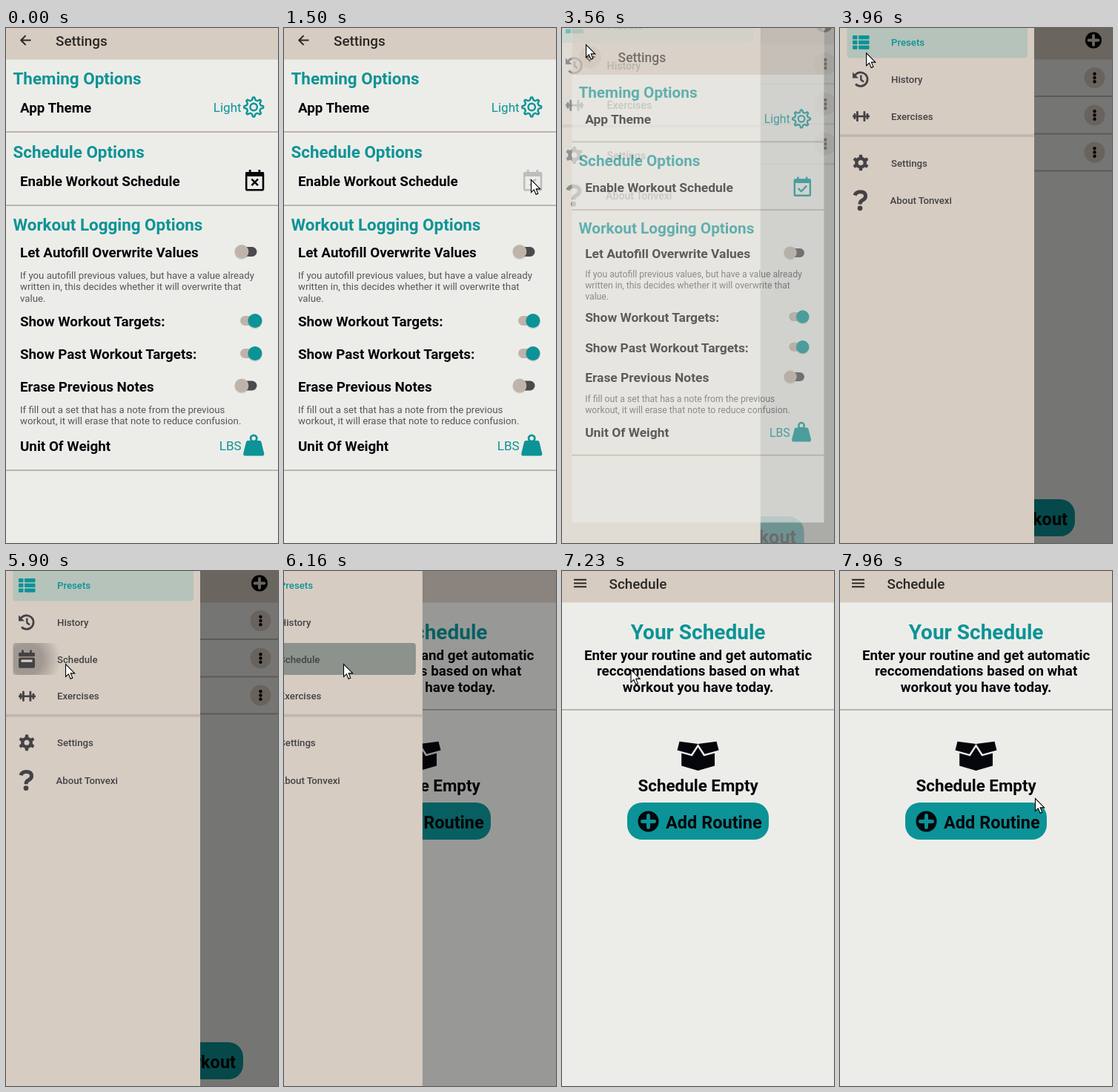
Recreate the animation shown at these times as an HTML page. Size 367 by 694 pixels, loop 8 s.

```html
<!DOCTYPE html>
<html lang="en">
<head>
<meta charset="utf-8">
<style>
html, body { margin: 0; height: 100%; overflow: hidden; background: #ecede8; }
svg { display: block; width: 100vw; height: 100vh; font-family: Roboto, sans-serif; }
</style>
</head>
<body>
<svg id="stage" viewBox="0 0 367 694"></svg>
<script>
const TEAL = '#0c9397', INK = '#05060c', TAN = '#d7ccc2', PAGE = '#ecede8', RULE = '#bfb3ab', DARK = '#434246';

const text = (x, mid, size, weight, fill, str, anchor = 'start') =>
  `<text x="${x}" y="${mid + size * .356}" font-size="${size}" font-weight="${weight}" fill="${fill}" text-anchor="${anchor}">${str}</text>`;
const rect = (x, y, w, h, fill, r = 0) =>
  `<rect x="${x}" y="${y}" width="${w}" height="${h}" rx="${r}" fill="${fill}"/>`;
const disc = (x, y, r, fill) => `<circle cx="${x}" cy="${y}" r="${r}" fill="${fill}"/>`;
const ring = (x, y, r, color, w) => `<circle cx="${x}" cy="${y}" r="${r}" fill="none" stroke="${color}" stroke-width="${w}"/>`;
const line = (d, color, w, cap = 'butt') =>
  `<path d="${d}" fill="none" stroke="${color}" stroke-width="${w}" stroke-linecap="${cap}" stroke-linejoin="round"/>`;
const shape = (d, fill) => `<path d="${d}" fill="${fill}" fill-rule="evenodd"/>`;
const group = (id, body) => `<g id="${id}">${body}</g>`;
const rule = y => rect(0, y - 1, 367, 2, RULE);
const page = rect(0, -52, 367, 746, PAGE) + rect(0, -52, 367, 94.5, TAN);

function gear(cx, cy, teeth, outer, inner, tip, root) {
  const pts = [];
  for (let i = 0; i < teeth; i++)
    for (const [off, r] of [[-root, inner], [-tip, outer], [tip, outer], [root, inner]]) {
      const a = (i + off) / teeth * 2 * Math.PI - Math.PI / 2;
      pts.push((cx + r * Math.cos(a)).toFixed(2) + ' ' + (cy + r * Math.sin(a)).toFixed(2));
    }
  return 'M' + pts.join('L') + 'Z';
}

const plus = (x, y, r, fill, cross) => disc(x, y, r, fill) +
  line(`M${x - r * .58} ${y}h${r * 1.16}M${x} ${y - r * .58}v${r * 1.16}`, cross, r * .35, 'round');

// Settings page
const label = (y, str) => text(19, y, 18.8, 700, INK, str);
const heading = (y, str) => text(9.5, y, 22.4, 700, TEAL, str);
const note = (y, lines) => lines.map((s, i) => text(19, y + i * 15.8, 13.2, 400, '#55565a', s)).join('');
const toggle = (y, on) => on
  ? rect(316, y - 6.5, 26, 13, RULE, 6.5) + disc(336, y + 1, 10, '#0002') + disc(336, y, 9.4, TEAL)
  : rect(312, y - 6.5, 26.5, 13, '#4b4a4c', 6.5) + disc(318, y + 1, 10, '#0001') + disc(318, y, 9.4, '#bfb4aa');
const calendar = (color, mark) =>
  `<rect x="324.2" y="195.2" width="22.8" height="23" rx="1.5" fill="none" stroke="${color}" stroke-width="2.6"/>` +
  rect(323.5, 194, 24.2, 6, color) + rect(327.8, 191, 2.8, 5, color) + rect(340.5, 191, 2.8, 5, color) +
  line(mark, color, 2.5);

const settings = page +
  group('press', disc(26.5, 17, 16, '#9a785024')) +
  line('M33.5 16.5H20.5M26.6 10.1L20.2 16.5L26.6 22.9', '#2a2825', 2) +
  text(67, 17.5, 18.85, 500, '#2a2825', 'Settings') +
  heading(68, 'Theming Options') + label(107, 'App Theme') +
  text(317.6, 107, 17, 400, TEAL, 'Light', 'end') +
  line(gear(334.2, 106.5, 8, 13, 9.6, .1, .32), TEAL, 2.4) + ring(334.2, 106.5, 4.7, TEAL, 2.4) +
  rule(140) + heading(167, 'Schedule Options') + label(206, 'Enable Workout Schedule') +
  group('calOff', calendar(INK, 'M331.4 203.6l8.6 8.6M340 203.6l-8.6 8.6')) +
  group('calOn', calendar(TEAL, 'M329.6 207.8l4.4 4.4l7.8-8.2')) +
  rule(239) + heading(265.5, 'Workout Logging Options') +
  label(302.5, 'Let Autofill Overwrite Values') + toggle(301.5) +
  note(333, ['If you autofill previous values, but have a value already',
    'written in, this decides whether it will overwrite that', 'value.']) +
  label(395.5, 'Show Workout Targets:') + toggle(394.5, true) +
  label(439.5, 'Show Past Workout Targets:') + toggle(438.5, true) +
  label(483, 'Erase Previous Notes') + toggle(482) +
  note(514, ['If fill out a set that has a note from the previous',
    'workout, it will erase that note to reduce confusion.']) +
  label(563, 'Unit Of Weight') + text(317.6, 563, 17, 400, TEAL, 'LBS', 'end') +
  ring(334.2, 553, 4.1, TEAL, 2.8) +
  shape('M326.5 556H342q2 0 2.5 2L348.2 573q.6 3.5-2.5 3.5H322.8q-3.1 0-2.5-3.5L324 558q.5-2 2.5-2Z', TEAL) +
  rule(596);

// Home page
const home = page + plus(342, 16.5, 11, '#000', TAN) +
  [67, 117.5, 167.5].map(y => rule(y + 25) + disc(343.5, y, 14, '#d3c7bc') +
    [-5.2, 0, 5.2].map(d => disc(343.5, y + d, 2.2, '#000')).join('')).join('') +
  `<rect id="start" y="635" height="50" rx="20" fill="${TEAL}"/>` +
  group('startText', text(307, 661.5, 23.5, 700, '#000', 'Start Workout', 'end'));

// Schedule page
const center = (y, size, fill, str) => text(183.6, y, size, 700, fill, str, 'middle');
const schedule = page +
  line('M16 11.8h17M16 16.5h17M16 21.2h17', '#2a2825', 2) +
  text(63.5, 17.5, 18.85, 500, '#2a2825', 'Schedule') +
  center(82, 28, TEAL, 'Your Schedule') +
  ['Enter your routine and get automatic', 'reccomendations based on what', 'workout you have today.']
    .map((s, i) => center(113 + i * 21.7, 18.75, INK, s)).join('') +
  rule(187) +
  shape('M158.5 229.7L183.5 233L174.5 246.7L155.5 241.5ZM208.5 229.7L183.5 233L192.5 246.7L211.5 241.5Z' +
    'M161.2 245.5L175.7 249.5L183.5 237.5L191.3 249.5L206 245.5V262.5L183.5 269L161.2 262.5Z', INK) +
  center(289.5, 22.4, INK, 'Schedule Empty') +
  rect(88, 312, 191, 50, TEAL, 20) + plus(116.5, 337.5, 14, INK, TEAL) +
  text(140, 339, 23.5, 700, INK, 'Add Routine');

// Drawer
const item = (x, y, str, fill = DARK) => text(x, y, 13.2, 500, fill, str);
const grid = [10, 16.7, 23.4].map(y => rect(17, y, 6.5, 5.3, TEAL, 1) + rect(25, y, 14.5, 5.3, TEAL, 1)).join('');
const clock = line('M20.3 63.5A9.3 9.3 0 1 1 21 75.5', DARK, 2.7) +
  shape('M17 59.5V67.5H25Z', DARK) + line('M28.3 63.5V69.7L32 72.5', DARK, 2.4);
const dumbbell = rect(17, 117.7, 23, 2.6, DARK) +
  [[18.5, 8], [22, 14], [31.5, 14], [35.5, 8]].map(([x, h]) => rect(x, 119 - h / 2, 2.8, h, DARK, 1)).join('');
const dayIcon = rect(17, 110, 22, 5.2, DARK, 1.5) + rect(21, 106.5, 3, 5, DARK, 1) + rect(32, 106.5, 3, 5, DARK, 1) +
  rect(17, 116.8, 22, 14, DARK, 2) + rect(20.5, 119.5, 15, 3.2, TAN, .5);
const cog = shape(gear(28, 181.5, 6, 11, 8, .17, .29) + 'M24.5 181.5a3.5 3.5 0 1 0 7 0a3.5 3.5 0 1 0-7 0Z', DARK);
const query = line('M20 225.5Q21.5 220.7 27.3 220.7Q34.5 220.7 34.5 226.5Q34.5 230 30.5 232Q27 233.7 27 237.5', DARK, 5) +
  disc(27, 242.8, 3.4, DARK);

const drawer = rect(0, -52, 262, 746, TAN) +
  `<rect id="active" x="9.5" width="243.5" height="43" rx="4" fill="${TEAL}" fill-opacity=".17"/>` +
  grid + item(69, 19.5, 'Presets', TEAL) + clock + item(69, 69.5, 'History') +
  group('dayItem', '<g clip-path="url(#itemClip)"><circle id="ripple" cx="28" cy="119" fill="url(#soft)"/></g>' +
    dayIcon + item(69, 119, 'Schedule')) +
  group('lower', dumbbell + item(69, 119, 'Exercises') + rect(0, 143.2, 262, 3.6, '#c1b6ad') +
    cog + item(69, 182, 'Settings') + query + item(67.5, 232.7, 'About Tonvexi'));

const $ = id => document.getElementById(id);
$('stage').innerHTML =
  `<defs><clipPath id="itemClip"><rect x="9.5" y="97" width="243.5" height="43" rx="4"/></clipPath>
  <radialGradient id="soft"><stop offset=".45" stop-color="#4f4a47" stop-opacity=".4"/>
  <stop offset="1" stop-color="#4f4a47" stop-opacity="0"/></radialGradient></defs>` +
  rect(0, 0, 367, 694, PAGE) +
  group('back', group('home', home) + group('schedule', schedule) +
    '<rect id="dim" x="-20" y="-60" width="410" height="790"/>' + group('drawer', drawer)) +
  group('settings', settings) +
  '<path id="cursor" d="M.5 .5V17.5L4.4 13.9L7 20.3L9.8 19.1L7.2 12.9H12.7Z" fill="#fff" stroke="#000" stroke-width="1.1"/>';

const clamp = v => Math.max(0, Math.min(1, v));
const ramp = (t, a, b) => clamp((t - a) / (b - a));
const easeOut = p => 1 - (1 - p) ** 2;
const smooth = p => p * p * (3 - 2 * p);
const linear = p => p;
const show = (id, on) => $(id).setAttribute('display', on ? 'inline' : 'none');
const set = (id, attr, v) => $(id).setAttribute(attr, v);
// Screens scale about the middle of the full page, part of which lies above the stage.
const zoom = s => `translate(${183.5 * (1 - s)} ${321 * (1 - s)}) scale(${s})`;

// time, x, y, easing towards that point
const path = [
  [440, 368, 252, linear], [830, 334, 204, easeOut], [1290, 334, 204, linear], [1300, 333, 204, linear],
  [1720, 333, 204, linear], [1960, 354, 225, smooth], [2040, 354, 225, linear], [2760, 40, 29, smooth],
  [2900, 36, 23, easeOut], [3100, 32, 22, easeOut], [3900, 32, 22, linear], [3960, 35, 33, linear],
  [4700, 80, 125, easeOut], [7170, 80, 125, linear], [7600, 309, 262, smooth], [7960, 263, 306, smooth]
];
function cursorAt(t) {
  const i = path.findIndex(k => k[0] > t);
  if (i < 0) return path.at(-1).slice(1, 3);
  if (!i) return path[0].slice(1, 3);
  const [t0, x0, y0] = path[i - 1], [t1, x1, y1, ease] = path[i];
  const p = ease(ramp(t, t0, t1));
  return [x0 + (x1 - x0) * p, y0 + (y1 - y0) * p];
}

function render(t) {
  show('cursor', t >= 500);
  set('cursor', 'transform', `translate(${cursorAt(t)})`);

  // A press dims the calendar at once; letting go swaps it and fades it back.
  const enabled = t >= 1740;
  show('calOff', !enabled);
  show('calOn', enabled);
  set('calOff', 'opacity', t < 1500 ? 1 : .2);
  set('calOn', 'opacity', .2 + .8 * ramp(t, 1710, 1960));

  // Settings shrinks away while the drawer screen settles in.
  const leaving = t >= 3500;
  show('press', leaving);
  show('back', leaving);
  show('settings', t < 3680);
  set('settings', 'opacity', leaving ? 1 - ramp(t, 3480, 3680) : 1);
  set('settings', 'transform', zoom(leaving ? 1 - .074 * ramp(t, 3480, 3560) : 1));
  set('back', 'opacity', ramp(t, 3480, 3630));
  set('back', 'transform', zoom(1.074 - .074 * easeOut(ramp(t, 3560, 3760))));

  const added = t >= 4020, wide = added ? 3 : 0;
  show('dayItem', added);
  set('lower', 'transform', `translate(0 ${added ? 49.8 : 0})`);
  set('start', 'x', 50 - wide);
  set('start', 'width', 267 + 2 * wide);
  set('startText', 'transform', `translate(${wide} 0)`);

  // Drawer closes on a critically damped spring.
  const chosen = t >= 6100;
  const w = Math.max(0, t - 6100) * .0174;
  const closed = 1 - (1 + w) * Math.exp(-w);
  show('home', !chosen);
  show('schedule', chosen);
  set('active', 'y', chosen ? 97 : -2.5);
  set('ripple', 'r', t < 5900 ? 0 : 44 + 520 * ramp(t, 5900, 6180));
  set('drawer', 'transform', `translate(${-262 * closed} 0)`);
  set('dim', 'opacity', .5 * (1 - closed));
  show('drawer', t < 6630);
  show('dim', t < 6630);
}

function frame(now) {
  render(now % 8000);
  requestAnimationFrame(frame);
}
render(0);
requestAnimationFrame(frame);
</script>
</body>
</html>
```
